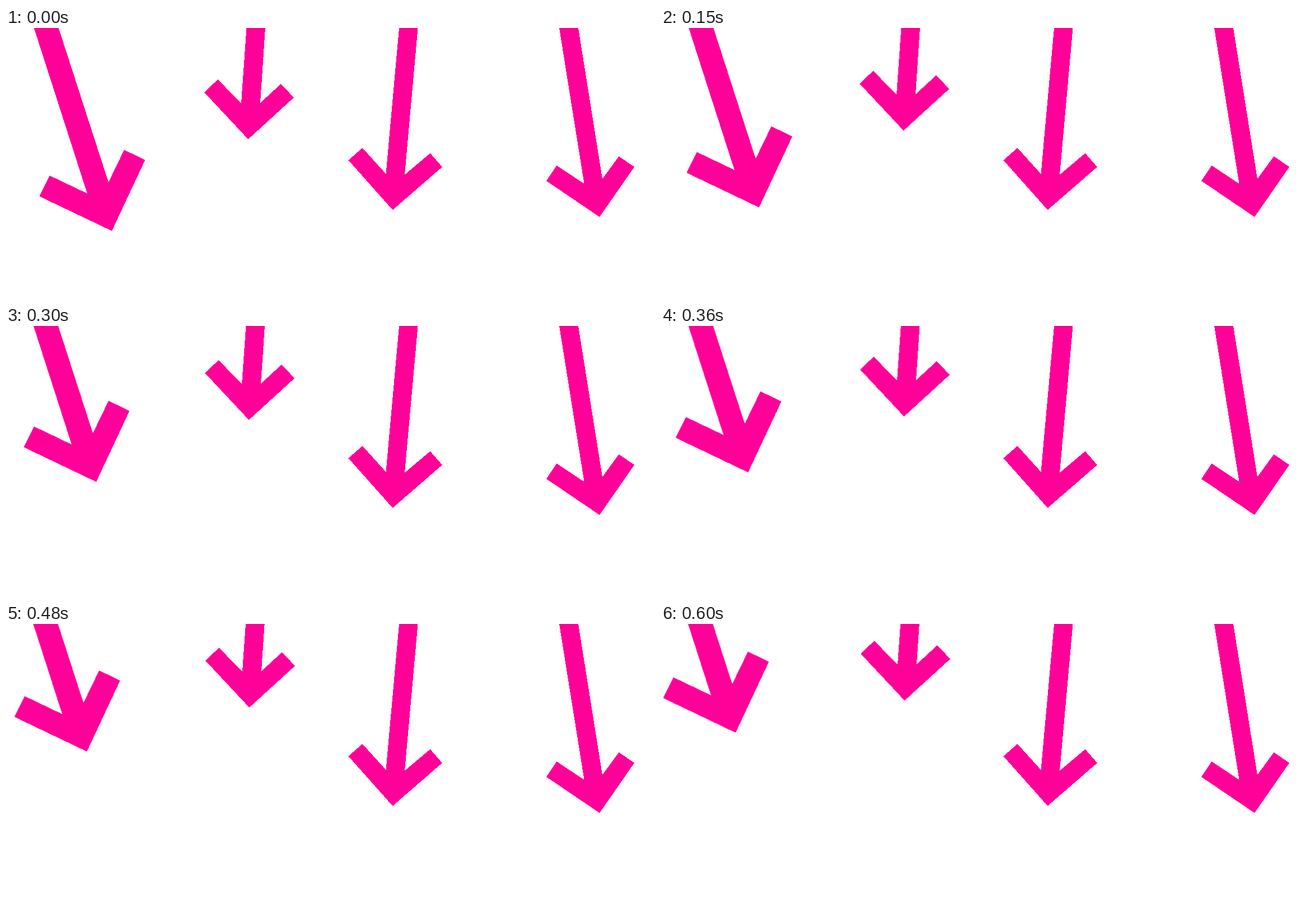
Recreate the animation shown at these times as an HTML page. Size 1159 by 483 pixels, loop 630 ms.

```html
<!DOCTYPE html>
<html lang="en">
<head>
<meta charset="utf-8">
<title>Arrows</title>
<style>
  html, body { margin: 0; width: 100%; height: 100%; overflow: hidden; background: #fff; }
  svg { display: block; width: 100%; height: 100%; }
  polygon { fill: #ff0099; shape-rendering: crispEdges; }
</style>
</head>
<body>
<svg viewBox="0 0 1159 483">
  <polygon id="left" points="-14.2,-200 29.5,-200 183,276 211,218 248.5,236 189,363 59.5,301 78,264 145,296"/>
  <polygon id="middle" points="436.5,-100 469.7,-100 454,134 491,100 514,124.5 432.5,199 354,115 378.5,92 420,135"/>
  <polygon points="702,0 735.5,0 712,262.5 757.5,224 779,248.5 690.5,325.5 611.5,236.5 636.5,214.5 678.5,261"/>
  <polygon points="988,0 1022,0 1065,270 1094.5,229.5 1122,248.5 1060,338 965,273.5 983.5,246 1032.5,278.5"/>
</svg>
<script>
  const STEPS = 21, STEP_MS = 30;

  // Retract an arrow by (dx, dy) per step, then snap back.
  function retract(id, dx, dy) {
    document.getElementById(id).animate(
      [
        { transform: 'translate(0px, 0px)' },
        { transform: `translate(${dx * STEPS}px, ${dy * STEPS}px)` }
      ],
      { duration: STEPS * STEP_MS, easing: `steps(${STEPS}, end)`, iterations: Infinity }
    );
  }

  retract('left', -2.79, -8.43);
  retract('middle', 0.125, -3.1);
</script>
</body>
</html>
```
